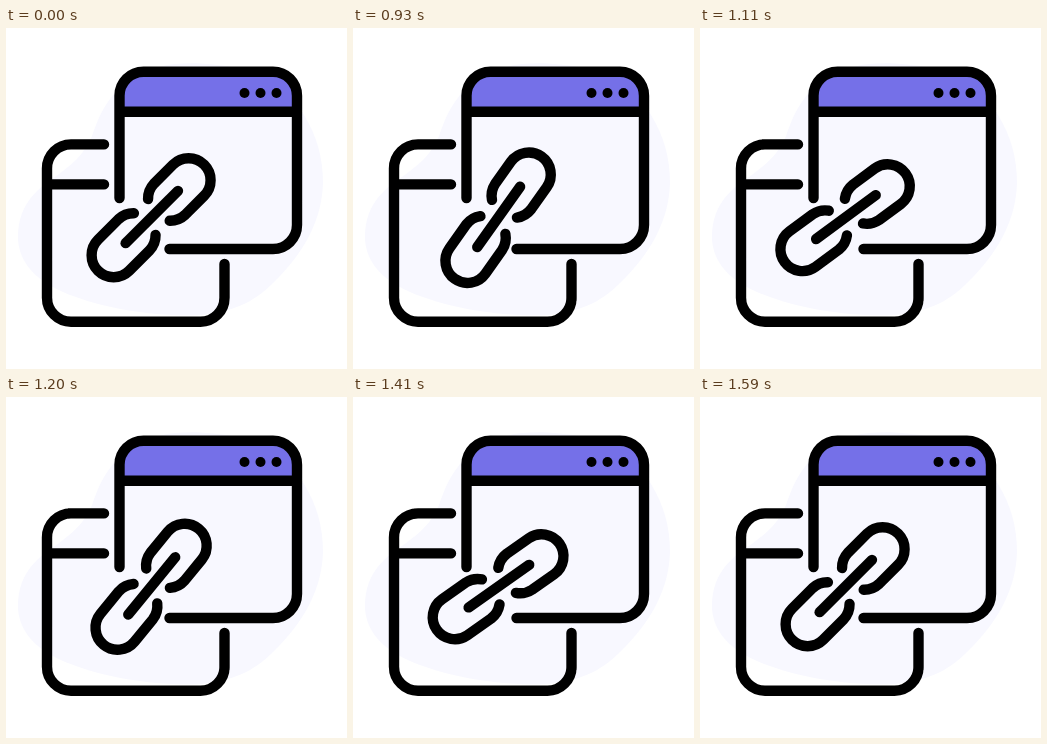
Animation of 341 by 341 pixels, one loop 2.73 s. Source, as an HTML page:

```html
<!DOCTYPE html>
<html lang="en">
<head>
<meta charset="utf-8">
<title>Linked windows</title>
<style>
  html, body { margin: 0; width: 100%; height: 100%; overflow: hidden; background: #fff; }
  svg { display: block; width: 100vw; height: 100vh; }
  .line { fill: none; stroke: #000; stroke-width: 10.4; stroke-linecap: round; stroke-linejoin: round; }
</style>
</head>
<body>
<svg viewBox="0 0 341 341">
  <path fill="#f8f8ff" d="M12 207C13 180 26 165 46 151C66 137 78 127 86 108C95 82 104 65 127 50C150 35 180 33 211 37C250 40 281 57 298 87C311 108 317 130 317 155C316 190 300 223 268 254C248 275 225 284 195 287C150 289 103 281 70 269C34 257 11 236 12 207Z"/>
  <path fill="#7570e8" d="M113.500 84V68A24 24 0 0 1 137.500 44H267A24 24 0 0 1 291 68V84Z"/>
  <g class="line">
    <path d="M98 116.400H65A24 24 0 0 0 41 140.400V269.700A24 24 0 0 0 65 293.700H194.500A24 24 0 0 0 218.500 269.700V236M41 156.400H98"/>
    <path d="M113.500 170V67.700A24 24 0 0 1 137.500 43.700H267A24 24 0 0 1 291 67.700V197A24 24 0 0 1 267 221H163.500M113.500 83.700H291"/>
  </g>
  <circle cx="238.500" cy="65" r="5"/>
  <circle cx="254.500" cy="65" r="5"/>
  <circle cx="270.500" cy="65" r="5"/>
  <g id="chain" class="line">
    <path d="M11 -15.300A22 22 0 0 1 26 -22H53A22 22 0 0 1 53 22H26A22 22 0 0 1 11 15.300"/>
    <path d="M-9 -15.300A22 22 0 0 0 -24 -22H-53A22 22 0 0 0 -53 22H-24A22 22 0 0 0 -9 15.300"/>
    <path d="M-36 0H38"/>
  </g>
</svg>
<script>
  const LOOP = 2730, STEP = 30, START = 750, SWING = 500 / 3;
  const angles = [0, -10, 10, -10, 10, 0];
  const chain = document.getElementById('chain');
  const ease = u => u * u * (3 - 2 * u);

  function tilt(t) {
    const p = Math.min(Math.max((t - START) / SWING, 0), angles.length - 1);
    const i = Math.min(Math.floor(p), angles.length - 2);
    return angles[i] + (angles[i + 1] - angles[i]) * ease(p - i);
  }

  function draw(now) {
    const t = Math.floor((now % LOOP) / STEP) * STEP;
    chain.setAttribute('transform', `translate(145.100 189.700) rotate(${tilt(t) - 45})`);
    requestAnimationFrame(draw);
  }
  draw(performance.now());
</script>
</body>
</html>
```
